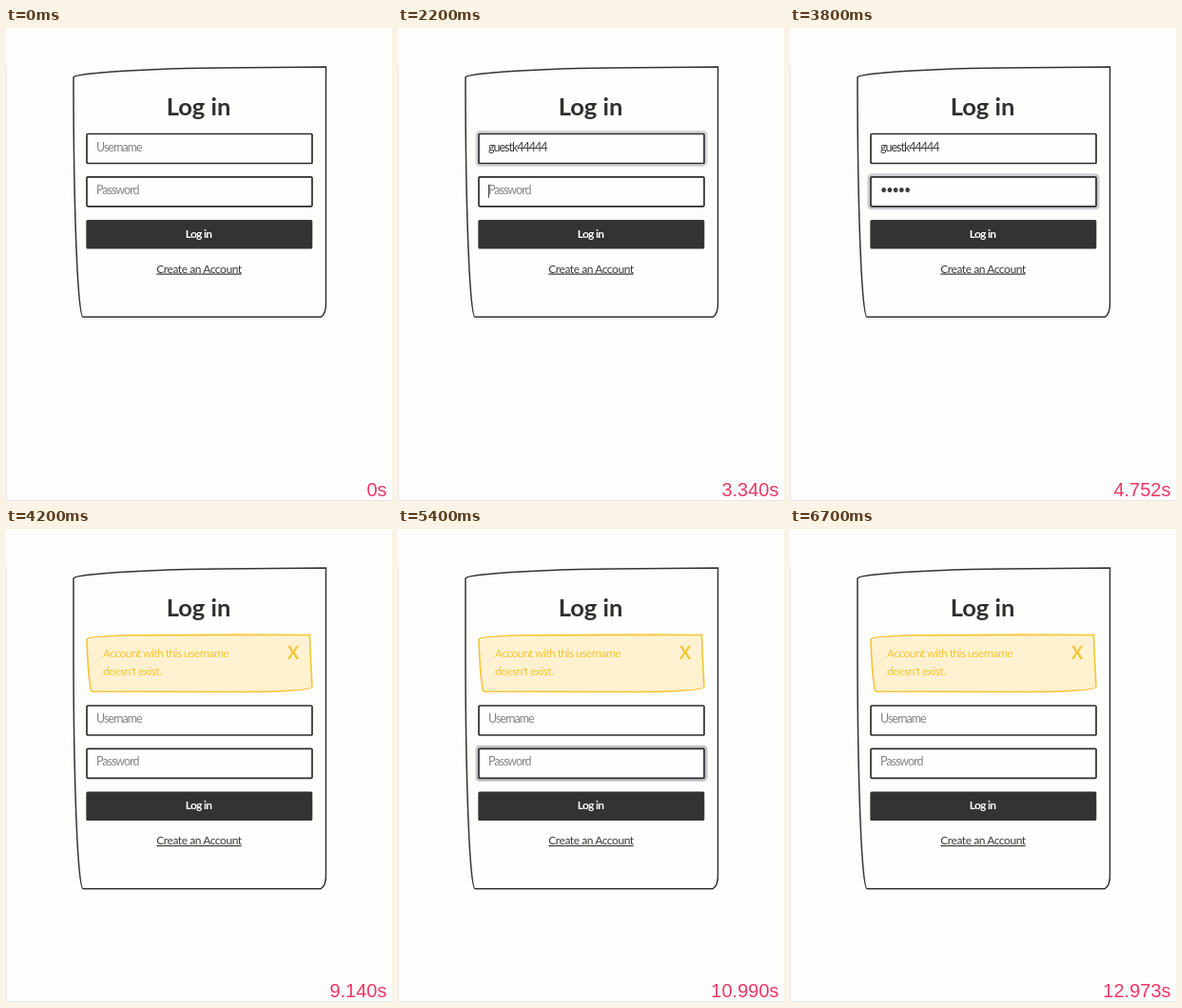
Animation of 406 by 498 pixels, one loop 6.8 s. Source, as an HTML page:

```html
<!DOCTYPE html>
<html lang="en">
<head>
<meta charset="utf-8">
<title>Log in</title>
<style>
  html, body { margin: 0; width: 100%; height: 100%; overflow: hidden; background: #fdfdfc; }
  svg { display: block; width: 406px; height: 498px; }
  text { font: 12px Lato, "Open Sans", sans-serif; fill: #3a3a3a; }
  .line { fill: none; stroke: #333; stroke-width: 1.5; }
  .box { fill: #fefefe; stroke: #2d2d2d; stroke-width: 1.7; }
  .ring { fill: none; stroke: #c2c2c6; stroke-width: 5; opacity: 0; filter: blur(.6px); }
  .entry { font-size: 12.5px; letter-spacing: -1px; }
  .hint { fill: #858585; }
  .caret { stroke: #444; stroke-width: 1; }
  .title { font-size: 25.5px; font-weight: 700; fill: #303030; }
  .button { fill: #fff; font-weight: 700; letter-spacing: -.7px; }
  .link { text-decoration: underline; letter-spacing: -.45px; }
  .alert text { fill: #f3c535; letter-spacing: -.55px; }
  .alert .close { font-size: 18px; font-weight: 700; }
  .alert path { fill: #fdf1d0; stroke: #f5c431; stroke-width: 1.6; }
  #clock { font: 20px "Liberation Sans", Arial, sans-serif; fill: #ec3765; text-anchor: end; }
  .mid { text-anchor: middle; }
</style>
</head>
<body>
<svg viewBox="0 0 406 498">
  <path d="M.5 40V498M0 497.5H406" stroke="#e6e6ea" fill="none"/>
  <path id="card" class="line"/>
  <text class="title mid" x="202.5" y="91.5">Log in</text>

  <g id="alert" class="alert">
    <path d="M85 116Q85 113 130 112Q220 111 319.5 111.5Q320 130 322 166Q322 171 250 171.5L90 171Q86.5 160 85 116Z"/>
    <text x="102" y="135">Account with this username</text>
    <text x="102" y="154">doesn't exist.</text>
    <text class="close" x="296" y="137">X</text>
  </g>

  <g id="form">
    <g id="user" transform="translate(85 111.5)">
      <rect class="ring" x="-1" y="-1" width="239" height="33" rx="2"/>
      <rect class="box" width="237" height="31" rx="1"/>
      <text class="entry" x="10" y="18"></text>
      <path class="caret" d="M.5 8V22"/>
    </g>
    <g id="pass" transform="translate(85 156.8)">
      <rect class="ring" x="-1" y="-1" width="239" height="33" rx="2"/>
      <rect class="box" width="237" height="31" rx="1"/>
      <text class="entry" x="10" y="18"></text>
      <path class="caret" d="M.5 8V22"/>
    </g>
    <rect x="84.3" y="202" width="238" height="30.5" rx="1.5" fill="#333"/>
    <text class="button mid" x="202.5" y="220.5">Log in</text>
    <text class="link mid" x="203" y="257.5">Create an Account</text>
  </g>

  <text id="clock" x="400.5" y="493"></text>
</svg>
<script>
const LOOP = 6800, STEP = 100;
const NAME = "guestk44444";
const RELOAD = 39;
const ALERT_SHIFT = 74.5;

// Recording clock: [step, seconds]
const CLOCK = [[0, 0], [1, .9], [8, 1.24], [13, 2.023], [22, 3.34], [31, 3.69],
               [38, 4.752], [39, 8.973], [42, 9.14], [54, 10.99], [67, 12.973]];

const $ = id => document.getElementById(id);
const clamp = (v, max = 1) => Math.max(0, Math.min(max, v));
const during = (n, from, to) => n >= from && n < to;

// Focus glow that eases in from one step and out from another
const glow = (n, on, off, fade = 6) =>
  clamp((n - on) / fade) * (1 - clamp((n - off) / fade));

function clockAt(n) {
  const i = Math.max(1, CLOCK.findIndex(k => k[0] >= n));
  const [n0, s0] = CLOCK[i - 1], [n1, s1] = CLOCK[i];
  return s0 + (s1 - s0) * (n - n0) / (n1 - n0);
}

function drawField(id, hint, value, ring, caret) {
  const field = $(id), text = field.querySelector("text"), bar = field.querySelector(".caret");
  text.textContent = value || hint;
  text.classList.toggle("hint", !value);
  field.querySelector(".ring").style.opacity = ring;
  bar.style.display = caret ? "" : "none";
  const x = value ? 11 + text.getComputedTextLength() : 10;
  bar.setAttribute("transform", `translate(${Math.round(x)} 0)`);
}

function drawCard(bottom) {
  $("card").setAttribute("d",
    `M71 52Q72 49.5 95 47.5Q150 42.5 225 42L336.5 41V${bottom - 16}` +
    `Q337 ${bottom - 3} 331 ${bottom}H81A10 250 0 0 1 71 ${bottom - 250}Z`);
}

function render(n) {
  const failed = n >= RELOAD;
  const shift = failed ? ALERT_SHIFT : 0;
  drawCard(304.3 + shift);
  $("alert").style.display = failed ? "" : "none";
  $("form").setAttribute("transform", `translate(0 ${shift})`);

  const typed = failed ? 0 : clamp(n - 8, NAME.length);
  const dots = failed ? 0 : clamp(n - 30, 5);
  const passGlow = failed ? glow(n, 47, 60) : glow(n, 22, 37);
  drawField("user", "Username", NAME.slice(0, typed),
    failed ? 0 : glow(n, 1, 20), during(n, 2, 22));
  drawField("pass", "Password", "•".repeat(dots),
    passGlow, during(n, 22, 37) || during(n, 48, 54));

  $("clock").textContent = n ? clockAt(n).toFixed(3) + "s" : "0s";
}

const start = performance.now();
let last = -1;
function tick() {
  const n = Math.floor((performance.now() - start) % LOOP / STEP);
  if (n !== last) render(last = n);
  requestAnimationFrame(tick);
}
tick();
</script>
</body>
</html>
```
